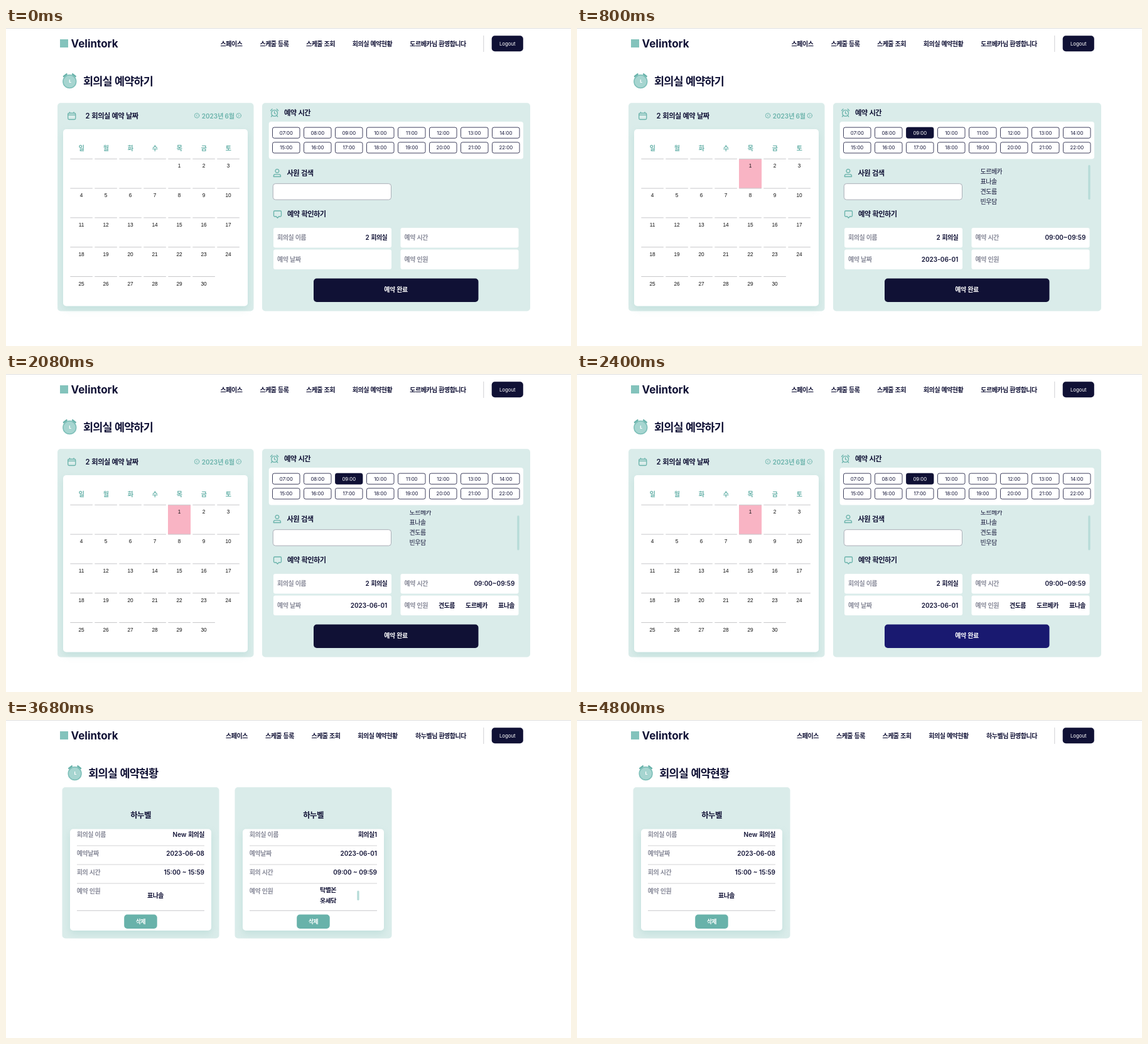
Write an HTML page that moves like this. It is 900x506 px and loops after 5600 ms.

```html
<!DOCTYPE html>
<html lang="ko">
<head>
<meta charset="utf-8">
<title>회의실 예약</title>
<style>
  html, body { margin: 0; width: 100%; height: 100%; overflow: hidden; background: #fff; }
  svg { display: block; width: 900px; height: 506px; }
  text { font-family: Inter, "Noto Sans CJK KR", sans-serif; white-space: pre; }
  .ko { letter-spacing: -.05em; }
  .day { font-family: "Liberation Sans", Arial, sans-serif; }
  .card { filter: drop-shadow(0 5px 6px rgba(104, 178, 170, .2)); }
  .icon { fill: none; stroke: #68b2aa; stroke-width: 1.3; stroke-linecap: round; stroke-linejoin: round; }
</style>
</head>
<body>
<svg id="stage" viewBox="0 0 900 506">
  <defs>
    <clipPath id="listClip"><rect x="640" y="217.5" width="170" height="64"/></clipPath>
    <clipPath id="guestClip"><rect x="470" y="266" width="86" height="25.5"/></clipPath>
  </defs>
</svg>
<script>
const STEP = 800, COUNT = 7;
const NAVY = '#101135', HOVER = '#191970', TEAL = '#68b2aa', MINT = '#daecea';
const GREY = '#888a99', THUMB = '#b6dcd8', LINE = '#c8c8cb';
const USER = '도르베카', TESTER = '하누벨';
const STAFF = [USER, '표나솔', '견도름', '빈우담'];
const stage = document.getElementById('stage');

function add(parent, tag, attrs = {}) {
  const el = document.createElementNS('http://www.w3.org/2000/svg', tag);
  for (const key in attrs) el.setAttribute(key, attrs[key]);
  return parent.appendChild(el);
}
const group = (parent, attrs) => add(parent, 'g', attrs);

// Box given by its edges.
function box(parent, x1, y1, x2, y2, rx, fill, more = {}) {
  return add(parent, 'rect', { x: x1, y: y1, width: x2 - x1, height: y2 - y1, rx, fill, ...more });
}

// Hangul runs are set tighter than Latin letters and digits.
function text(parent, str, x, y, { size = 10, weight = 600, fill = NAVY, anchor = 'start', cls = '' } = {}) {
  const el = add(parent, 'text', {
    x, y, fill, 'font-size': size, 'font-weight': weight, 'text-anchor': anchor, class: cls
  });
  for (const run of str.match(/[가-힣]+|[^가-힣]+/g))
    add(el, 'tspan', { class: /[가-힣]/.test(run) ? 'ko' : '' }).textContent = run;
  return el;
}
const mid = (parent, str, x, y, opts) => text(parent, str, x, y, { anchor: 'middle', ...opts });
const right = (parent, str, x, y) => text(parent, str, x, y, { anchor: 'end' });
const label = (parent, str, x, y) => text(parent, str, x, y, { fill: GREY });
const rule = (parent, x, y, w, stroke = LINE, width = 1) =>
  add(parent, 'path', { d: `M${x} ${y}h${w}`, stroke, 'stroke-width': width });
const icon = (parent, d) => add(parent, 'path', { d, class: 'icon' });

// Hard cuts: value(i) holds for the whole of step i.
function steps(el, prop, value) {
  const frames = Array.from({ length: COUNT + 1 }, (_, i) =>
    ({ offset: i / COUNT, [prop]: value(Math.min(i, COUNT - 1)), easing: 'step-end' }));
  el.animate(frames, { duration: STEP * COUNT, iterations: Infinity });
  return el;
}
const show = (el, from, to) => steps(el, 'opacity', i => i >= from && i < to ? 1 : 0);

function nav(parent, user, centers) {
  const items = ['스페이스', '스케줄 등록', '스케줄 조회', '회의실 예약현황', user + '님 환영합니다'];
  items.forEach((str, i) => mid(parent, str, centers[i], 28.7));
}

function heading(parent, str, dx) {
  const g = group(parent, { transform: `translate(${dx} 0)` });
  add(g, 'path', { d: 'M92 77l4.500-3.500M110.600 77l-4.500-3.500', stroke: TEAL, 'stroke-width': 2.6, 'stroke-linecap': 'round' });
  add(g, 'circle', { cx: 101.3, cy: 85.2, r: 10.4, fill: '#a6d5d0', stroke: '#7cbfb8', 'stroke-width': 1.5 });
  add(g, 'path', { d: 'M101.300 82v4.500h2.500', fill: 'none', stroke: '#fff', 'stroke-width': 1.2 });
  text(g, str, 123, 90.6, { size: 17.5 });
}

function header() {
  box(stage, 86, 18, 99, 31, 0, '#83c3bc');
  text(stage, 'Velintork', 103.5, 31, { size: 17, weight: 700 });
  add(stage, 'path', { d: 'M760.8 12v26', stroke: '#cfcfd2' });
  box(stage, 773.7, 12.3, 823.8, 37.3, 5, NAVY);
  mid(stage, 'Logout', 798.8, 28, { size: 7.8, weight: 400, fill: '#fff' });
}

function calendar(parent) {
  box(parent, 82, 119.2, 394.5, 450.5, 5, MINT);
  icon(parent, 'M100.5 135.5h8.500a1.800 1.800 0 0 1 1.800 1.800v6.400a1.800 1.800 0 0 1-1.800 1.800h-8.500a1.800 1.800 0 0 1-1.800-1.800v-6.400a1.800 1.800 0 0 1 1.800-1.800zM98.700 138.300h12M101.500 134v1.500M108 134v1.500');
  text(parent, '2 회의실 예약 날짜', 126.5, 144, { size: 11.25 });
  text(parent, '2023년 6월', 311.8, 143.7, { fill: TEAL });
  for (const [x, d] of [[304, 1], [370.7, -1]]) {
    add(parent, 'circle', { cx: x, cy: 139.4, r: 3.7, class: 'icon', style: 'stroke-width:.9' });
    add(parent, 'path', { d: `M${x + .8 * d} 137.7l${-1.7 * d} 1.7l${1.7 * d} 1.7`, class: 'icon', style: 'stroke-width:.9' });
  }
  box(parent, 91, 161, 385, 442.5, 5, '#fff', { class: 'card' });

  const colX = c => 102.3 + 39 * c, rowY = r => 208.3 + 46.8 * r;
  show(box(parent, colX(4) - .3, rowY(0), colX(4) + 35.8, rowY(1), 0, '#f9b4c4'), 1, 4);
  [...'일월화수목금토'].forEach((d, c) => mid(parent, d, colX(c) + 17.7, 195.3, { fill: TEAL }));
  for (let cell = 0; cell < 34; cell++) {
    const c = cell % 7, r = Math.floor(cell / 7), day = cell - 3;
    rule(parent, colX(c), rowY(r), 35.6);
    if (day > 0) mid(parent, String(day), colX(c) + 17.7, rowY(r) + 14, { size: 8.3, weight: 400, fill: '#111', cls: 'day' });
  }
}

function times(parent) {
  icon(parent, 'M422.700 135.500a4.900 4.900 0 1 0 9.800 0a4.900 4.900 0 1 0-9.800 0M427.600 132.800v3l1.800 1M421.500 131.500l2.500-2.500M433.700 131.500l-2.500-2.500M423.800 139.500l-1.300 1.500M431.400 139.500l1.300 1.500');
  text(parent, '예약 시간', 443, 139.2, { size: 11.25 });
  box(parent, 418.7, 149, 824, 208.5, 4, '#fff');
  for (let i = 0; i < 16; i++) {
    const x = 424.5 + 50 * (i % 8), y = i < 8 ? 158.1 : 181.8;
    const str = String(i + 7).padStart(2, '0') + ':00';
    const b = box(parent, x, y, x + 43.5, y + 17.2, 2.8, '#fff', { stroke: NAVY, 'stroke-width': .8 });
    const t = mid(parent, str, x + 21.8, y + 11.6, { size: 7.8, weight: 400 });
    if (i === 2) {
      steps(b, 'fill', k => k ? NAVY : '#fff');
      steps(t, 'fill', k => k ? '#fff' : NAVY);
    }
  }
}

function staff(parent) {
  icon(parent, 'M429 227.500a2.900 2.900 0 1 0 5.800 0a2.900 2.900 0 1 0-5.800 0M426.300 236.500v-1.200a2.600 2.600 0 0 1 2.600-2.400h6a2.600 2.600 0 0 1 2.600 2.400v1.200z');
  text(parent, '사원 검색', 447.5, 234.7, { size: 11.25 });
  box(parent, 425.3, 247.7, 613.5, 273.2, 4, '#fff', { stroke: '#9a9ca8', 'stroke-width': .8 });

  const list = show(group(parent), 1, 4);
  const names = group(group(list, { 'clip-path': 'url(#listClip)' }));
  STAFF.forEach((n, i) => text(names, n, 642.5, 231.7 + 16.2 * i, { weight: 400 }));
  const thumb = box(list, 814.3, 218, 817.6, 273, 1.6, THUMB);
  const scroll = (el, dy) => steps(el, 'transform', i => `translateY(${i > 1 ? dy : 0}px)`);
  scroll(names, -8.2);
  scroll(thumb, 7.3);
}

function confirm(parent) {
  icon(parent, 'M428 291h9a1.500 1.500 0 0 1 1.500 1.500v6a1.500 1.500 0 0 1-1.500 1.500h-2.500l-2 2.300l-2-2.300h-2.500a1.500 1.500 0 0 1-1.500-1.500v-6a1.500 1.500 0 0 1 1.500-1.500z');
  text(parent, '예약 확인하기', 448, 300.4, { size: 11.25 });
  const field = (str, x, y) => {
    box(parent, x, y, x + 188, y + 31.5, 3, '#fff');
    label(parent, str, x + 6, y + 19);
  };
  field('회의실 이름', 426, 318);
  field('예약 시간', 628.5, 318);
  field('예약 날짜', 426, 352.6);
  field('예약 인원', 628.5, 352.6);
  right(parent, '2 회의실', 607.3, 337);
  const picked = show(group(parent), 1, 4);
  right(picked, '09:00~09:59', 810.3, 337);
  right(picked, '2023-06-01', 607.3, 371.8);
  const guests = show(group(parent), 2, 4);
  [[STAFF[2], 702], [STAFF[0], 749.5], [STAFF[1], 797]].forEach(([n, x]) => mid(guests, n, x, 371.6));
  steps(box(parent, 490, 398.5, 752.5, 436, 5, NAVY), 'fill', i => i === 3 ? HOVER : NAVY);
  mid(parent, '예약 완료', 621, 420.3, { fill: '#fff' });
}

function booking() {
  const g = show(group(stage), 0, 4);
  nav(g, USER, [359, 427.5, 501, 583.5, 688]);
  heading(g, '회의실 예약하기', 0);
  calendar(g);
  box(g, 408, 119.2, 835, 450.5, 5, MINT);
  times(g);
  staff(g);
  confirm(g);
}

function ticket(parent, dx, values) {
  const g = group(parent, { transform: `translate(${dx} 0)` });
  box(g, 89.5, 107, 339.5, 347.5, 5, MINT);
  mid(g, TESTER, 214.5, 156.3, { size: 12.5 });
  box(g, 102, 173.5, 327, 335, 5, '#fff', { class: 'card' });
  ['회의실 이름', '예약날짜', '회의 시간', '예약 인원'].forEach((str, i) => {
    label(g, str, 112.8, 186.3 + 30 * i);
    if (values[i]) right(g, values[i], 316, 186.3 + 30 * i);
    rule(g, 113, i < 3 ? 200 + 30 * i : 303.3, 203, '#d3d3d6', 1.2);
  });
  box(g, 188.2, 309.6, 240.7, 332, 5, TEAL);
  mid(g, '삭제', 214.5, 323.8, { size: 8.75, fill: '#fff' });
}

function modal() {
  const g = show(group(stage), 5, 6);
  box(g, 0, 0, 900, 506, 0, 'rgba(0,0,0,.6)');
  box(g, 397.5, 240, 518.5, 352, 4, '#fff', { class: 'card' });
  mid(g, '삭제 하시겠습니까?', 457, 278.5, { size: 11.25 });
  box(g, 408, 316, 455, 336.5, 5, '#48857f');
  mid(g, '네', 431.5, 329.4, { size: 8.75, fill: '#fff' });
  box(g, 459, 316.5, 505.3, 336.2, 5, MINT, { stroke: TEAL });
  mid(g, '아니요', 482, 329.4, { size: 8.75, fill: TEAL });
}

function status() {
  const g = show(group(stage), 4, COUNT);
  nav(g, TESTER, [367.5, 436, 509.5, 592, 692.5]);
  heading(g, '회의실 예약현황', 8.3);
  ticket(g, 0, ['New 회의실', '2023-06-08', '15:00 ~ 15:59']);
  mid(g, STAFF[1], 238, 282.6);

  const second = show(group(g), 4, 6);
  ticket(second, 275, ['회의실1', '2023-06-01', '09:00 ~ 09:59']);
  const guests = group(second, { 'clip-path': 'url(#guestClip)' });
  mid(guests, '탁별온', 513, 274.2);
  mid(guests, '옹세담', 513, 291.5);
  box(second, 559.3, 271.5, 562.6, 287, 1.6, THUMB);
}

header();
booking();
status();
modal();
box(stage, 0, 0, 900, 1, 0, '#dededf');
</script>
</body>
</html>
```
